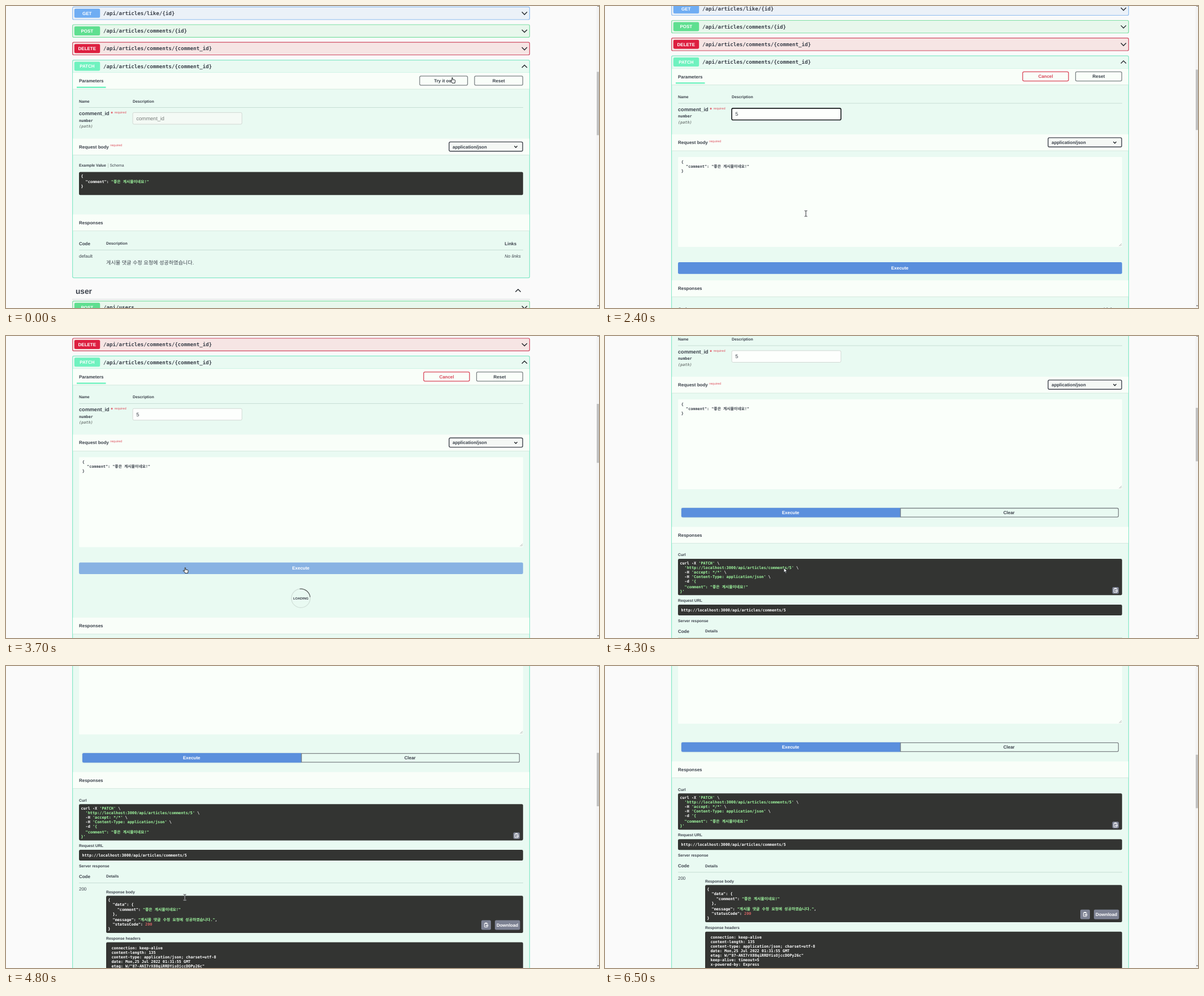
Recreate the animation shown at these times as an HTML page with a canvas. Size 1048x534 px, loop 7100 ms.

```html
<!DOCTYPE html>
<html lang="ko">
<head>
<meta charset="utf-8">
<title>API docs</title>
<style>
html, body { margin: 0; width: 100%; height: 100%; overflow: hidden; background: #fafafa; }
canvas { display: block; }
</style>
</head>
<body>
<canvas id="stage" width="1048" height="534"></canvas>
<script>
const ctx = document.getElementById('stage').getContext('2d');
const W = 1048, H = 534, LOOP = 7100, TICK = 100;
const SANS = '"Liberation Sans", "Noto Sans CJK KR", sans-serif';
const MONO = '"DejaVu Sans Mono", "Noto Sans CJK KR", monospace';
const S = 6.84, M = 7.98, L = 9.12; // 12, 14 and 16 px at page zoom
const INK = '#3b414b', GREEN = '#a0f9a0', DARK = '#333432', RED = '#d9465a', GREY = '#7d8386';
const MINT = '#6ff2bf', MINT_BG = '#e9faf2', PALE = '#f9fef9', BLUE = '#5a8fdd';
const COMMENT = '"좋은 게시물이네요!"';
const DONE_TEXT = '게시물 댓글 수정 요청에 성공하였습니다.';

// Page height and the offset of the "Responses" section in each state
const STATES = {
  idle: { height: 2546, shift: 0 },
  open: { height: 2670, shift: 124 },
  loading: { height: 2736, shift: 189.6 },
  done: { height: 3017, shift: 131.4 },
};
const BASE_SCROLL = 555;
const SCROLL = [[0, 0], [2300, 0], [3100, 60.2], [3900, 60.2], [4000, 68], [4100, 95],
  [4300, 162.5], [4800, 312.4], [4900, 325], [5000, 331.3]];

// time, x, y of the hot spot, shape
const POINTER = [
  [0, 788, 126.5, 'hand'], [200, 786, 128, 'hand'], [300, 783, 130, 'hand'], [400, 782, 131, 'hand'],
  [1200, 640, 160, 'arrow'], [1300, 450, 192, 'arrow'], [1400, 397, 203, 'beam'], [1600, 396, 200, 'beam'],
  [2000, 389, 245, 'beam'], [2100, 376, 310, 'beam'], [2200, 369, 356, 'beam'], [2400, 355, 367, 'beam'],
  [2800, 345, 371, 'beam'], [3100, 331, 382, 'beam'], [3200, 319, 405, 'hand'], [3300, 316, 409.5, 'hand'],
  [3800, 316, 410, 'arrow'], [4400, 316, 409, 'beam'], [5300, 258, 428, 'beam'], [5400, 318, 439, 'beam'],
  [5600, 318, 441, 'beam'], [5700, 285, 395, 'beam'], [5800, 240, 330, 'beam'], [5900, 190, 258, 'beam'],
  [6000, 140, 188, 'arrow'], [6100, 97, 129, 'arrow'], [6200, 62, 82, 'arrow'], [6300, 37, 50, 'arrow'],
  [6400, 23, 22, 'arrow'], [6500, 0, 0, 'none'],
];

function track(points, t) {
  const i = points.findIndex(p => p[0] > t);
  if (i < 0) return points.at(-1)[1];
  const [t0, a] = points[i - 1], [t1, b] = points[i];
  return a + (b - a) * (t - t0) / (t1 - t0);
}

function mix(a, b, k) {
  return `rgb(${a.map((v, i) => Math.round(v + (b[i] - v) * k)).join()})`;
}

function text(str, x, middle, { size = M, weight = 'bold', style = '', color = INK, family = SANS, align = 'left' } = {}) {
  ctx.font = `${style} ${weight} ${size}px ${family}`;
  ctx.fillStyle = color;
  ctx.textAlign = align;
  ctx.fillText(str, x, middle + size * 0.36);
  return ctx.measureText(str).width;
}

function box(x, y, w, h, fill, stroke, line = 1.2, radius = 2.3) {
  ctx.beginPath();
  ctx.roundRect(x, y, w, h, radius);
  if (fill) { ctx.fillStyle = fill; ctx.fill(); }
  if (stroke) { ctx.strokeStyle = stroke; ctx.lineWidth = line; ctx.stroke(); }
}

function rule(y, x0 = 129, x1 = 914, color = '#bfd6cd') {
  ctx.fillStyle = color;
  ctx.fillRect(x0, y - 0.35, x1 - x0, 0.8);
}

function poly(points, color, width) {
  ctx.beginPath();
  points.forEach(([x, y]) => ctx.lineTo(x, y));
  ctx.strokeStyle = color;
  ctx.lineWidth = width;
  ctx.stroke();
}

function chevron(x, y, dir = 1, w = 4.6, color = '#22262b') {
  poly([[x - w, y - w / 2 * dir], [x, y + w / 2 * dir], [x + w, y - w / 2 * dir]], color, 1.4);
}

function button(label, x, w, color = GREY, ink = INK) {
  box(x, 123.9, w, 16.2, null, color, 1.3);
  text(label, x + w / 2, 132, { color: ink, align: 'center' });
}

// Segments between bars alternate between the plain and the accent colour.
function code(lines, x, y, { plain = '#fff', accent = GREEN, tall = 1.4, pitch = 8.05 } = {}) {
  lines.forEach((line, n) => {
    if (n) y += pitch + (/[가-힣]/.test(line) ? tall : 0);
    let at = x;
    line.split('|').forEach((part, i) => {
      at += text(part, at, y, { size: S, family: MONO, color: i % 2 ? accent : plain });
    });
  });
}

function row(method, path, y, color, border, bg, open) {
  if (!open) box(117.6, y - 11, 807.8, 22.3, bg, border);
  box(120.8, y - 8, 45.4, 16, color, null);
  text(method, 143.3, y, { color: '#fff', align: 'center' });
  text(path, 172, y, { size: L, family: MONO });
  chevron(916.3, y + 0.2, open ? -1 : 1);
}

function section(y, title) {
  ctx.fillStyle = PALE;
  ctx.fillRect(118.2, y, 806.6, 28.8);
  rule(y + 29, 118.2, 924.8, '#cfe4da');
  text(title, 129, y + 14.3);
}

function required(x, y) {
  text('required', x, y, { size: 5.7, weight: 'normal', color: '#df5562' });
}

function copyIcon(x, y, w) {
  box(x, y, w, w, '#7d8293', null);
  const cx = x + w / 2, cy = y + w / 2;
  box(cx - 3, cy - 3.2, 5.6, 6.8, null, '#fff', 1, 0.5);
  ctx.fillStyle = '#fff';
  ctx.fillRect(cx - 1.8, cy - 4.3, 3.2, 2);
  poly([[cx + 4, cy + 0.8], [cx - 0.6, cy + 0.8]], '#fff', 1.2);
  poly([[cx + 0.8, cy - 0.8], [cx - 0.8, cy + 0.8], [cx + 0.8, cy + 2.4]], '#fff', 0.8);
}

function parameters(t, idle) {
  section(118, 'Parameters');
  ctx.fillStyle = MINT;
  ctx.fillRect(125, 142.6, 51.5, 2.4);
  if (idle) {
    button('Try it out', 731.1, 84.6);
    button('Reset', 828.1, 85.2);
  } else {
    const tone = mix([125, 131, 134], [217, 70, 90], Math.min(1, (t - 600) / 400));
    button('Cancel', 738.2, 81, tone, tone);
    button('Reset', 831.6, 81.7);
  }
  text('Name', 129, 168.2, { size: S });
  text('Description', 224, 168.2, { size: S });
  rule(179.5);
  const star = 129 + text('comment_id ', 129, 190, { size: L });
  text('*', star, 190, { size: L, color: '#df4050' });
  required(191.7, 188);
  text('number', 129, 202.3, { size: S, family: MONO });
  text('(path)', 129, 213, { size: S, family: MONO, style: 'italic', color: '#78807d' });

  const focused = t >= 1600 && t < 3300, filled = t >= 1800;
  box(224, 188.4, 193, 20.6, idle ? '#f4faf5' : '#fdfffd', focused ? '#14171a' : '#d2d8d4', focused ? 1.6 : 1);
  text(filled ? '5' : 'comment_id', 230.2, 198.5,
    { size: L, weight: 'normal', color: filled ? INK : '#757a78' });
}

function requestBody(idle) {
  section(234.5, 'Request body');
  required(184.3, 246);
  box(783.1, 240.4, 130, 16.4, '#f5f8f5', '#41444e', 1.4);
  text('application/json', 789.2, 248.7);
  chevron(901, 248.9, 1, 2.6);
  if (idle) {
    text('Example Value', 129, 282, { size: S });
    rule(282, 180.2, 180.8);
    ctx.fillStyle = '#a9b8b1';
    ctx.fillRect(180.2, 278.2, 0.7, 8);
    text('Schema', 183.4, 282, { size: S, weight: 'normal' });
    box(129, 293.5, 784.8, 40.7, DARK);
    code(['{', `  "comment": |${COMMENT}`, '}'], 132.4, 300.6);
    return;
  }
  box(129.2, 274.4, 784.6, 159, '#fafffa', null, 0, 1);
  code(['{', `  "comment": ${COMMENT}`, '}'], 134.8, 282.7, { plain: INK, tall: 0.3 });
  poly([[908.6, 432], [913, 427.6]], '#8d9692', 0.7);
  poly([[911, 432], [913, 430]], '#8d9692', 0.7);
}

function executeButtons(t, state) {
  if (state === 'done') {
    ctx.save();
    ctx.shadowColor = 'rgba(40,80,150,.4)';
    ctx.shadowBlur = 2;
    box(135, 466.4, 387, 16.7, BLUE, null, 0, [2.3, 0, 0, 2.3]);
    ctx.restore();
    box(522.2, 467, 385.2, 15.6, null, GREY, 1.3, [0, 2.3, 2.3, 0]);
    text('Execute', 328, 474.7, { color: '#fff', align: 'center' });
    text('Clear', 714, 474.7, { align: 'center' });
    return;
  }
  ctx.globalAlpha = state === 'loading' ? 0.67 : 1;
  box(129, 460.6, 784.8, 20.6, BLUE, null);
  ctx.globalAlpha = 1;
  text('Execute', 521, 470.8, { color: '#fff', align: 'center' });
  if (state === 'loading') spinner(521, 523.9, (t - 3595) * 0.36);
}

function spinner(x, y, degrees) {
  const arc = (from, to, color) => {
    ctx.beginPath();
    ctx.arc(x, y, 16.6, from * Math.PI / 180, to * Math.PI / 180);
    ctx.strokeStyle = color;
    ctx.lineWidth = 1.2;
    ctx.stroke();
  };
  arc(0, 360, 'rgba(85,85,85,.16)');
  arc(degrees - 135, degrees - 45, 'rgba(0,0,0,.6)');
  text('LOADING', x, y + 0.2, { size: 5.9, align: 'center' });
}

function responseTable(shift) {
  ctx.save();
  ctx.translate(0, shift);
  section(368.6, 'Responses');
  text('Code', 129, 420);
  text('Description', 177, 420, { size: S });
  text('Links', 881.3, 420);
  rule(431.3);
  text('default', 129, 442, { weight: 'normal' });
  text('No links', 881.3, 442, { weight: 'normal', style: 'italic' });
  text(DONE_TEXT, 177, 454, { size: L, weight: 'normal' });
  ctx.restore();
}

function serverResponse() {
  section(500, 'Responses');
  text('Curl', 129, 549.5, { size: S });
  box(129, 556.6, 784.8, 64.2, DARK);
  code(["curl -X |'PATCH'| \\",
    "  |'http://localhost:3000/api/articles/comments/5'| \\",
    "  -H |'accept: */*'| \\",
    "  -H |'Content-Type: application/json'| \\",
    "  -d |'{",
    `|  "comment": ${COMMENT}`,
    "|}'"], 132.4, 564);
  copyIcon(896.5, 606.6, 11.6);
  text('Request URL', 129, 630.2, { size: S });
  box(129, 637.5, 784.8, 19, DARK);
  code(['http://localhost:3000/api/articles/comments/5'], 134.6, 647);
  text('Server response', 129, 666.3, { size: S });
  text('Code', 129, 684.4);
  text('Details', 177, 684.4, { size: S });
  rule(696);
  text('200', 129, 706.7, { weight: 'normal' });
  text('Response body', 177, 711.6, { size: S });
  box(177, 718.6, 736.8, 65.8, DARK);
  code(['{', '  "data": {', `    "comment": |${COMMENT}`, '  },',
    `  "message": |"${DONE_TEXT}"|,`], 180.3, 725.6);
  code(['  "statusCode": |200', '}'], 180.3, 769, { accent: '#d36363' });
  copyIcon(840, 762, 17);
  box(864, 762, 44.4, 17, '#7d8293', null);
  text('Download', 886, 770.4, { color: '#fff', align: 'center' });
  text('Response headers', 177, 794, { size: S });
  box(177, 801, 736.8, 90, DARK);
  code(['connection: keep-alive', 'content-length: 135', 'content-type: application/json; charset=utf-8',
    'date: Mon,25 Jul 2022 01:31:55 GMT', 'etag: W/"87-ANI7rX88qiRRDYisOjccDOPy26c"',
    'keep-alive: timeout=5', 'x-powered-by: Express'], 186.4, 810.6);
}

function scrollbar(scroll, height) {
  ctx.fillStyle = '#f3f3f3';
  ctx.fillRect(1043.4, 0, 4.6, H);
  const k = H / height;
  ctx.fillStyle = '#c1c1c1';
  ctx.fillRect(1044, (BASE_SCROLL + scroll) * k, 4, H * k);
  ctx.fillStyle = '#555';
  ctx.fillRect(1045.5, 0, 2, 1);
  ctx.beginPath();
  ctx.moveTo(1044.8, 529.2);
  ctx.lineTo(1048, 529.2);
  ctx.lineTo(1046.4, 531.2);
  ctx.fill();
}

const SHAPES = {
  hand: 'M0 .3q1-.9 1.5.3v3l3.6.7q1.2.3 1 1.6l-.7 2.6v1.3h-4.8l-.3-1.2-3.2-2.7q-.3-1.2 1-.9l1.7.9z',
  arrow: 'M0 0v8.3l2-1.8 1.3 2.9 1.4-.6-1.3-2.8h2.7z',
  beam: 'M-2.4-5h1.6l.8.7.8-.7h1.6M0-4.3v8.6M-2.4 5h1.6l.8-.7.8.7h1.6',
};

function pointer(t) {
  const [, x, y, shape] = POINTER.findLast(p => p[0] <= t);
  if (shape === 'none') return;
  const path = new Path2D(SHAPES[shape]);
  ctx.save();
  ctx.translate(x, y);
  if (shape === 'beam') {
    ctx.strokeStyle = 'rgba(255,255,255,.7)';
    ctx.lineWidth = 2;
    ctx.stroke(path);
  } else {
    ctx.fillStyle = '#f4f6f5';
    ctx.fill(path);
  }
  ctx.strokeStyle = '#2b2f33';
  ctx.lineWidth = 1;
  ctx.stroke(path);
  ctx.restore();
}

function draw(t) {
  const state = t < 700 ? 'idle' : t < 3600 ? 'open' : t < 3800 ? 'loading' : 'done';
  const { height, shift } = STATES[state];
  const idle = state === 'idle', scroll = track(SCROLL, t), grown = height - STATES.idle.height;
  ctx.textRendering = 'geometricPrecision';
  ctx.fillStyle = '#fafafa';
  ctx.fillRect(0, 0, W, H);

  ctx.save();
  ctx.translate(0, -scroll);
  row('GET', '/api/articles/like/{id}', 12.7, '#6fadf3', '#8fbdf0', '#ebf1f8');
  row('POST', '/api/articles/comments/{id}', 44, '#5fdf90', '#7fdfa5', '#e8f7ec');
  row('DELETE', '/api/articles/comments/{comment_id}', 75.2, '#dd1f40', '#cf4a62', '#f6e5e4');
  box(117.6, 95.6, 807.8, 385 + grown, MINT_BG, '#86e8c8');
  row('PATCH', '/api/articles/comments/{comment_id}', 106.5, MINT, null, null, true);
  rule(118, 118, 925, '#a5ecd2');
  parameters(t, idle);
  requestBody(idle);
  if (!idle) executeButtons(t, state);
  if (state === 'done') serverResponse();
  else responseTable(shift);

  ctx.translate(0, grown);
  text('user', 123, 503.6, { size: 13.7 });
  chevron(905, 503.3, -1);
  rule(518.6, 117, 926, '#c9d5d0');
  row('POST', '/api/users', 532.7, '#5fdf90', '#7fdfa5', '#e8f7ec');
  ctx.restore();

  scrollbar(scroll, height);
  pointer(t);
}

function frame() {
  const t = performance.now() % LOOP;
  draw(Math.floor(t / TICK) * TICK);
  requestAnimationFrame(frame);
}
frame();
</script>
</body>
</html>
```
